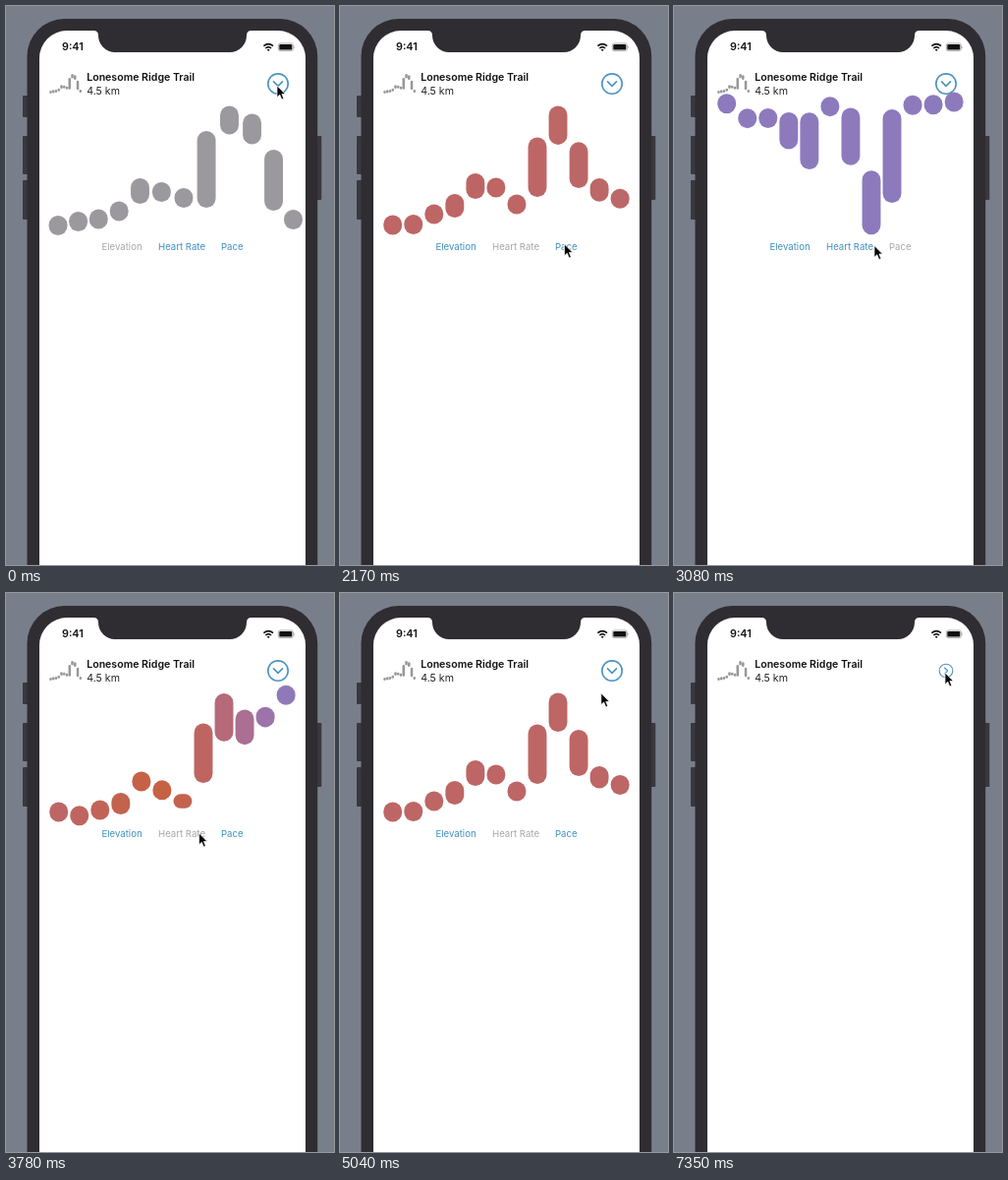
Recreate the animation shown at these times as an HTML page. Size 334x568 px, loop 7560 ms.

```html
<!DOCTYPE html>
<html lang="en">
<head>
<meta charset="utf-8">
<title>Trail graph</title>
<style>
  html, body { margin: 0; width: 100%; height: 100%; overflow: hidden; background: #787e8a; }
  svg { display: block; width: 334px; height: 568px; font-family: Inter, "Liberation Sans", sans-serif; }
</style>
</head>
<body>
<svg viewBox="0 0 334 568">
  <rect width="334" height="568" fill="#787e8a"/>
  <g fill="#38383e">
    <rect x="17" y="91" width="8" height="22" rx="1"/>
    <rect x="17" y="132" width="8" height="39" rx="1"/>
    <rect x="17" y="177" width="8" height="40" rx="1"/>
    <rect x="313" y="132" width="8.3" height="65" rx="1"/>
  </g>
  <rect x="21.5" y="13" width="295.7" height="640" rx="38" fill="#2f2d32"/>
  <path fill="#fff" d="M34 570V53A28 28 0 0 1 62 25H89Q94 25 94 30A17 17 0 0 0 111 47H228A17 17 0 0 0 245 30Q245 25 250 25H277A28 28 0 0 1 305 53V570Z"/>

  <text x="57" y="45.4" font-size="10.8" font-weight="600" fill="#111">9:41</text>
  <g fill="none" stroke="#111" stroke-width="1.6">
    <path d="M262.4 40.7Q267.2 36.4 272 40.7"/>
    <path d="M264.3 43Q267.2 40.4 270.1 43"/>
    <path d="M267.2 46L265.7 44.3Q267.2 43.2 268.7 44.3Z" fill="#111" stroke="none"/>
  </g>
  <rect x="277.3" y="38" width="15" height="7.6" rx="2" fill="none" stroke="#999" stroke-width=".8"/>
  <rect x="278.3" y="39" width="13" height="5.6" rx="1.2" fill="#111"/>
  <path d="M293.2 40.4Q294.5 41.8 293.2 43.2Z" fill="#888"/>

  <g id="mini" fill="#98989b"></g>
  <text x="82.2" y="76" font-size="10.6" font-weight="600" fill="#111">Lonesome Ridge Trail</text>
  <text x="82.2" y="90" font-size="10.6" fill="#222">4.5 km</text>
  <g id="toggle" fill="none" stroke="#4c95c3" stroke-width="1.1" stroke-linecap="round" stroke-linejoin="round">
    <circle r="6.8"/>
    <path d="M-1.4 -3L1.6 0L-1.4 3"/>
  </g>

  <g id="bars"></g>
  <g id="labels" font-size="9.6" text-anchor="middle">
    <text x="118" y="247.6">Elevation</text>
    <text x="179" y="247.6">Heart Rate</text>
    <text x="230.2" y="247.6">Pace</text>
  </g>
  <path id="cursor" d="M0 0V11.8L2.8 9.2L4.8 14L6.8 13.1L4.9 8.5H8.5Z" fill="#050505" stroke="#fff" stroke-width=".7" stroke-linejoin="round"/>
</svg>
<script>
const LOOP = 7560, TICK = 70;
const COUNT = 12, BAR_WIDTH = 18.9, FIRST_X = 53.7, STEP_X = 21.04;
const CENTER = { x: 169.5, y: 170 };
const COLLAPSE_AT = 5420, EXPAND_AT = -730, SLIDE = 220;

// Each bar is top, height.
const SERIES = [
  { color: [155, 153, 157], bars: [[213,20],[209,20],[206.5,20],[198.5,20],[175,26],[179,20],[185,20],[127,78],[101.5,29],[109.5,31],[146,62],[207,20]] },
  { color: [189, 102, 101], bars: [[212.5,20],[212,20],[201.5,20],[191,24],[170,26],[174.5,20],[191.5,20],[133.5,60.5],[101.5,39.5],[139,47],[176,22.5],[185,20]] },
  { color: [140, 122, 189], bars: [[89,20],[104,20],[104,20],[108,37.5],[108.5,57.5],[92.5,20],[104,58],[167,65],[105,94.5],[91,20],[90,20],[86.5,20]] }
];
const SWITCHES = [
  { at: 1400, from: 0, to: 1 },
  { at: 2220, from: 1, to: 2 },
  { at: 3425, from: 2, to: 1 }
];
const MOVES = [
  { start: 490, end: 1213, from: [276, 81], to: [186, 243] },
  { start: 1600, end: 2100, from: [186, 243], to: [228.5, 242] },
  { start: 2600, end: 3300, from: [228.5, 242], to: [196.5, 244] },
  { start: 4450, end: 5210, from: [196.5, 244], to: [276, 81] }
];

const $ = id => document.getElementById(id);
const clamp = v => Math.max(0, Math.min(1, v));
const mix = (a, b, p) => a + (b - a) * p;
const smooth = p => (p = clamp(p), p * p * (3 - 2 * p));

function spring(ms) {
  if (ms <= 0) return 0;
  const s = ms / 1000, w = 14.65;
  return 1 - Math.exp(-7.6 * s) * (Math.cos(w * s) + 0.518 * Math.sin(w * s));
}
const ripple = (ms, index) => spring(ms - 30 * index);

// Colours blend in linear light and overshoot along with the spring.
function mixColor(a, b, p) {
  const channels = a.map((v, k) => {
    const light = mix((v / 255) ** 2.2, (b[k] / 255) ** 2.2, p);
    return Math.round(255 * clamp(light) ** (1 / 2.2));
  });
  return `rgb(${channels})`;
}

function addRect(parent) {
  const rect = document.createElementNS("http://www.w3.org/2000/svg", "rect");
  return parent.appendChild(rect);
}

function placeCapsule(rect, cx, cy, w, h) {
  const attrs = { x: cx - w / 2, y: cy - h / 2, width: w, height: h, rx: Math.min(w, h) / 2 };
  for (const name in attrs) rect.setAttribute(name, attrs[name]);
}

const barX = i => FIRST_X + STEP_X * i;
const bars = Array.from({ length: COUNT }, () => addRect($("bars")));
const labels = [...$("labels").children];

SERIES[0].bars.forEach(([top, h], i) => {
  const cy = 69 + (top + h / 2 - 101.5) * 0.152;
  placeCapsule(addRect($("mini")), 44.2 + (barX(i) - 44) * 0.131, cy, 2.5, h * 0.152);
});

function drawBars(t, change) {
  const from = SERIES[change.from], to = SERIES[change.to];
  bars.forEach((rect, i) => {
    const p = ripple(t - change.at, i);
    const top = mix(from.bars[i][0], to.bars[i][0], p);
    const h = Math.max(0, mix(from.bars[i][1], to.bars[i][1], p));
    const slide = t < 700 ? SLIDE * (1 - ripple(t - EXPAND_AT, i)) : 0;
    const scale = clamp(1 - ripple(t - COLLAPSE_AT, i));
    const gone = t - COLLAPSE_AT - 30 * i > 143;
    const cx = mix(CENTER.x, barX(i) + slide, scale);
    const cy = mix(CENTER.y, top + h / 2, scale);
    placeCapsule(rect, cx, cy, BAR_WIDTH * scale, h * scale);
    rect.setAttribute("fill", mixColor(from.color, to.color, p));
    rect.setAttribute("opacity", gone ? 0 : scale);
  });
}

function drawLabels(active, open) {
  labels.forEach((label, i) => label.setAttribute("fill", i === active ? "#a6a6a8" : "#3f8fbf"));
  $("labels").setAttribute("opacity", open);
  $("labels").setAttribute("transform",
    `translate(${CENTER.x} ${CENTER.y}) scale(${open}) translate(${-CENTER.x} ${-CENTER.y})`);
}

function drawCursor(t) {
  const move = MOVES.findLast(m => t >= m.start) || MOVES[0];
  const p = smooth((t - move.start) / (move.end - move.start));
  const [x, y] = move.from.map((v, k) => mix(v, move.to[k], p));
  $("cursor").setAttribute("transform", `translate(${x} ${y})`);
}

function render(t) {
  const change = SWITCHES.findLast(s => t >= s.at) || SWITCHES[0];
  const active = t >= change.at ? change.to : change.from;
  const open = 1 - smooth((t - COLLAPSE_AT) / 350);
  drawBars(t, change);
  drawLabels(active, open);
  $("toggle").setAttribute("transform", `translate(277 79) rotate(${90 * open}) scale(${1 + 0.5 * open})`);
  drawCursor(t);
}

const begin = performance.now();
function frame() {
  const t = (performance.now() - begin) % LOOP;
  render(Math.floor(t / TICK) * TICK);
  requestAnimationFrame(frame);
}
frame();
</script>
</body>
</html>
```
